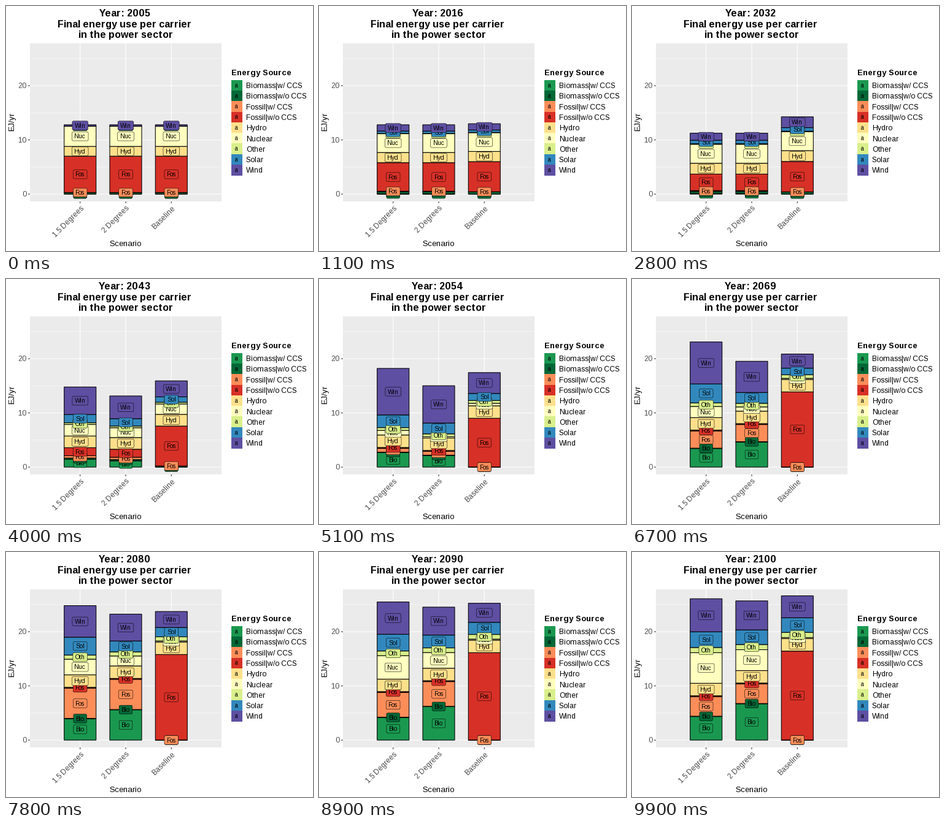
Recreate the animation shown at these times as a matplotlib script. Size 500 by 400 pixels, loop 10 s.

```python
import numpy as np
import matplotlib.pyplot as plt
from matplotlib.animation import FuncAnimation
from matplotlib.patches import FancyBboxPatch, Rectangle

plt.rcParams.update({
    "font.family": "Liberation Sans",
    "path.snap": False,
    "text.hinting_factor": 1,      # whole-pixel glyph advances
})

W, H, DPI = 500, 400, 100
PT = 72 / DPI                      # points per pixel
FRAMES, INTERVAL = 100, 100

LEFT, RIGHT, TOP, BOTTOM = 39, 351, 61, 319
ZERO, UNIT = 307.1, 8.85           # pixel row of 0 EJ, pixels per EJ
STEP = (RIGHT - LEFT) / 4.2
BAR = 0.7 * STEP
LABEL_SIZE, LABEL_H, PAD = 9.96, 14.4, 7.6
KEY = 17.28

CARRIERS = {
    "Biomass|w/ CCS": "#1A9850", "Biomass|w/o CCS": "#006837",
    "Fossil|w/ CCS": "#FC8D59", "Fossil|w/o CCS": "#D73027",
    "Hydro": "#FEE08B", "Nuclear": "#FFFFBF", "Other": "#D9EF8B",
    "Solar": "#3288BD", "Wind": "#5E4FA2",
}

# Turning points (year: EJ) of each carrier; straight lines in between.
SHARED = {
    "Biomass|w/ CCS": {2005: 0},
    "Biomass|w/o CCS": {2005: .28, 2016: .43, 2032: .4, 2054: 0},
    "Fossil|w/ CCS": {2005: .02},
    "Hydro": {2005: 1.8, 2032: 2, 2054: 2.3},
    "Nuclear": {2005: 3.7, 2016: 3.45, 2032: 3.5},
    "Other": {2005: .03, 2032: .1, 2054: .52, 2100: .95},
    "Solar": {2005: 0, 2016: .45, 2032: .65},
    "Wind": {2005: .26, 2016: 1.2, 2032: 1.3},
}
POLICY = {
    "Biomass|w/ CCS": {2032: .1},
    "Biomass|w/o CCS": {2054: .06},
    "Fossil|w/ CCS": {2032: .15, 2054: .7, 2069: 3.1, 2080: 5.6, 2100: 3.6},
    "Fossil|w/o CCS": {2005: 6.7, 2053: .17},
}
SCENARIOS = {
    "1.5 Degrees": (POLICY, {
        "Biomass|w/ CCS": {2054: 2.7, 2080: 3.95, 2100: 4.35},
        "Nuclear": {2054: .84, 2080: 2.9, 2100: 5.65},
        "Solar": {2069: 3.5, 2100: 2.9},
        "Wind": {2054: 8.6, 2069: 7.8, 2080: 5.8, 2100: 6.1},
    }),
    "2 Degrees": (POLICY, {
        "Biomass|w/ CCS": {2054: 2.15, 2069: 4.6, 2080: 5.6, 2100: 6.7},
        "Nuclear": {2054: .23, 2069: .75, 2100: 3.85},
        "Solar": {2054: 2, 2080: 2, 2100: 2.7},
        "Wind": {2054: 6.9, 2080: 4.95, 2100: 5.35},
    }),
    "Baseline": ({}, {
        "Fossil|w/o CCS": {2005: 6.7, 2016: 5.5, 2032: 5.6, 2054: 9,
                           2069: 13.8, 2080: 15.8, 2100: 16.4},
        "Nuclear": {2054: .45, 2069: .2},
        "Solar": {2054: 1.3, 2069: 1.2, 2100: 2.7},
        "Wind": {2032: 2, 2054: 3.85, 2069: 2.6, 2080: 2.95, 2100: 4.05},
    }),
}


def trend(carrier, layers):
    """Merge turning points, later layers overriding earlier ones."""
    points = {}
    for layer in (SHARED, *layers):
        points.update(layer.get(carrier, {}))
    years = sorted(points)
    return years, [points[y] for y in years]


def row(value):
    return ZERO - UNIT * value


fig = plt.figure(figsize=(W / DPI, H / DPI), dpi=DPI, facecolor="white")
ax = fig.add_axes([0, 0, 1, 1])
ax.set(xlim=(0, W), ylim=(H, 0))
ax.axis("off")


def text(x, y, s, size, **kw):
    kw = {"va": "baseline", "ha": "left", "color": "black", **kw}
    return ax.text(x, y, s, fontsize=size * PT, **kw)


def line(x, y, color, width):
    ax.plot(x, y, color=color, lw=width * PT, solid_capstyle="butt", zorder=1)


def box(x, y, w, h, color):
    ax.add_patch(Rectangle((x, y), w, h, fc=color, ec="none", zorder=0.5,
                           antialiased=False))


# Panel, grid and axes
box(LEFT, TOP, RIGHT - LEFT, BOTTOM - TOP, "#EBEBEB")
for v in (5, 15, 25):
    line([LEFT, RIGHT], [row(v)] * 2, "white", 0.53)
for v in (0, 10, 20):
    line([LEFT, RIGHT], [row(v)] * 2, "white", 1.07)
    line([LEFT - 3, LEFT], [row(v)] * 2, "#333333", 1.07)
    text(33.5, row(v) + 4.3, str(v), 12, ha="right", color="#4D4D4D")

centers = [LEFT + STEP * (k + 1.1) for k in range(len(SCENARIOS))]
for x, name in zip(centers, SCENARIOS):
    line([x, x], [TOP, BOTTOM], "white", 1.07)
    line([x, x], [BOTTOM, BOTTOM + 3], "#333333", 1.07)
    text(x + 6.5, 331, name, 12, ha="right", rotation=45,
         rotation_mode="anchor", color="#4D4D4D")

text(195.5, 392, "Scenario", 13, ha="center")
text(13.5, 189.5, "EJ/yr", 13, ha="center", rotation=90,
     rotation_mode="anchor")

# Titles
title = text(193, 17, "", 16, ha="center", weight="bold")
text(193, 35, "Final energy use per carrier", 16, ha="center", weight="bold")
text(195.5, 52, "in the power sector", 16, ha="center", weight="bold")

# Legend
text(367, 113, "Energy Source", 13, weight="bold")
for k, (name, color) in enumerate(CARRIERS.items()):
    y = 121.2 + k * KEY
    box(367.2, y, KEY, KEY, color)
    text(375.8, y + KEY / 2 + 2.7, "a", LABEL_SIZE, ha="center")
    text(391, y + KEY / 2 + 4.3, name, 12)


class Segment:
    """One carrier's bar piece with its tag."""

    def __init__(self, x, name, color, layers, z):
        self.trend = trend(name, layers)
        self.word = text(x, 0, name[:3], LABEL_SIZE, ha="center",
                         zorder=z + 0.5)
        w = self.word.get_window_extent().width + PAD
        self.bar = Rectangle((x - BAR / 2, 0), BAR, 1, fc=color, ec="black",
                             lw=1.07 * PT, zorder=3)
        self.tag = FancyBboxPatch((x - w / 2, 0), w, LABEL_H, fc=color,
                                  ec="black", lw=0.53 * PT, zorder=z,
                                  boxstyle="round,pad=0,rounding_size=2.16")
        ax.add_patch(self.bar)
        ax.add_patch(self.tag)

    def place(self, year, base):
        value = np.interp(year, *self.trend)
        mid = row(base + value / 2)
        self.bar.set_y(row(base + value))
        self.bar.set_height(value * UNIT)
        self.tag.set_y(mid - LABEL_H / 2)
        self.word.set_y(mid + 3.6)
        return base + value


stacks = [[Segment(x, name, color, layers, 4 + k)
           for k, (name, color) in enumerate(CARRIERS.items())]
          for x, layers in zip(centers, SCENARIOS.values())]


def draw(i):
    year = 2005 + 95 * i / (FRAMES - 1)
    title.set_text(f"Year: {round(year)}")
    for stack in stacks:
        top = 0
        for segment in stack:
            top = segment.place(year, top)
    return []


anim = FuncAnimation(fig, draw, frames=FRAMES, interval=INTERVAL,
                     init_func=lambda: draw(0), repeat=True, repeat_delay=0)
plt.show()
```
